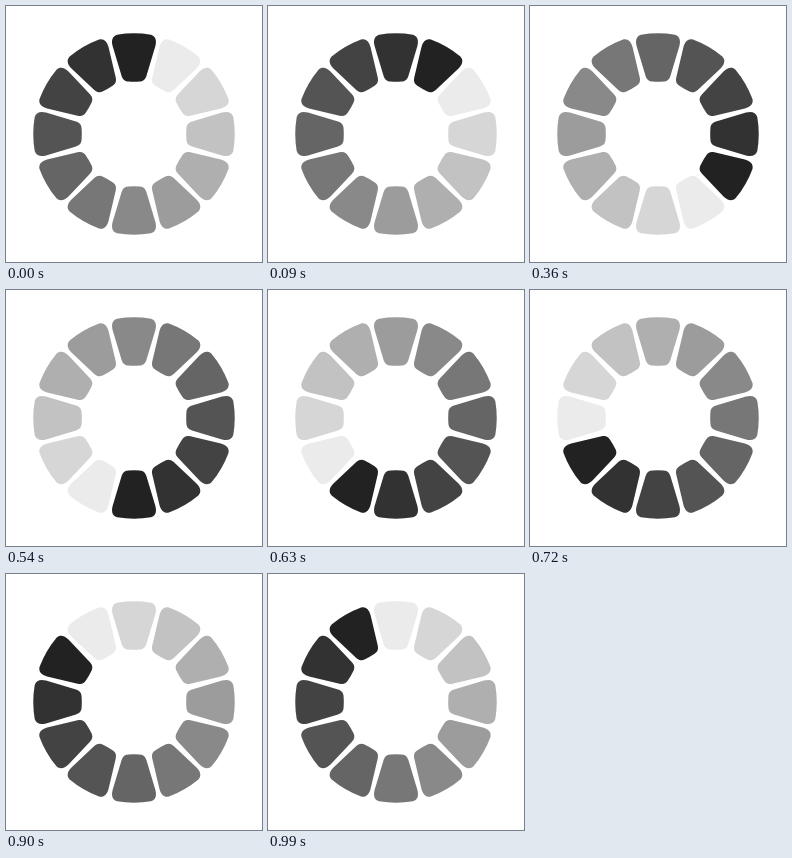
Animation of 256x256 px, one loop 1.08 s. Source, as an HTML page:

```html
<!DOCTYPE html>
<html>
<head>
<meta charset="utf-8">
<style>
html, body { margin: 0; height: 100%; overflow: hidden; background: #fff; }
svg { display: block; width: 100%; height: 100%; }
</style>
</head>
<body>
<svg viewBox="0 0 256 256"><g id="ring" transform="translate(128 128)"></g></svg>
<script>
const COUNT = 12, STEP = 90;
const shades = [34, 50, 67, 84, 101, 119, 137, 156, 175, 194, 214, 235];
const petal = 'M-12.4-58L-21.4-88C-22.8-93.5-21.8-97.8-17-99.3A101 101 0 0 1 17-99.3' +
  'C21.8-97.8 22.8-93.5 21.4-88L12.4-58C11-53.8 8.8-52.6 5.5-52.4Q0-52 -5.5-52.4C-8.8-52.6-11-53.8-12.4-58Z';
const ring = document.getElementById('ring');

const petals = Array.from({ length: COUNT }, (_, i) => {
  const path = document.createElementNS('http://www.w3.org/2000/svg', 'path');
  path.setAttribute('d', petal);
  path.setAttribute('transform', `rotate(${i * 360 / COUNT})`);
  return ring.appendChild(path);
});

function draw(time) {
  const head = Math.floor(time / STEP) % COUNT;
  petals.forEach((path, i) => {
    const v = shades[(head - i + COUNT) % COUNT];
    path.setAttribute('fill', `rgb(${v},${v},${v})`);
  });
}

function tick() {
  draw(performance.now());
  requestAnimationFrame(tick);
}
draw(0);
requestAnimationFrame(tick);
</script>
</body>
</html>
```
